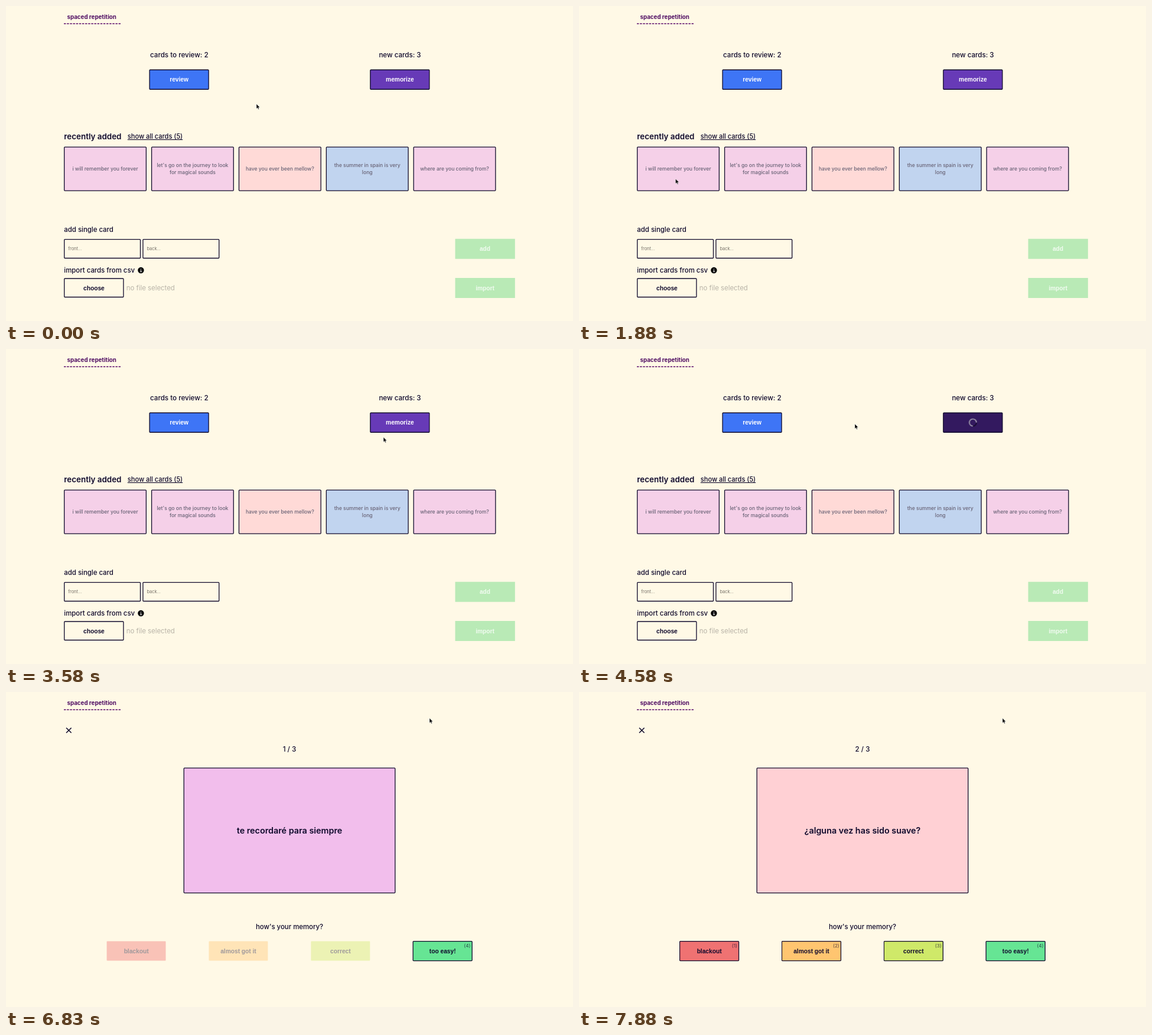
An HTML page that plays this animation: 960 px wide and 534 px high, repeating every 8000 ms.

```html
<!DOCTYPE html>
<html lang="en">
<head>
<meta charset="utf-8">
<title>Flashcards</title>
<style>
  html, body { margin: 0; width: 100%; height: 100%; overflow: hidden; background: #fff9e6; }
  svg { display: block; width: 960px; height: 534px; }
  text { font: 500 11.4px Inter, sans-serif; fill: #100a2c; }
  .mid { text-anchor: middle; }
  .brand { font-size: 9.75px; font-weight: 700; fill: #4f0d62; }
  .count { font-size: 11.6px; }
  .heading { font-size: 13.4px; font-weight: 600; }
  .link { font-size: 11.05px; text-decoration: underline; }
  .label { font: 700 10.2px "Liberation Sans", Arial, sans-serif; text-anchor: middle; }
  .white { fill: #fff; }
  .soft { fill: #fff; opacity: .8; }
  .cards text { font-size: 8.55px; text-anchor: middle; fill: #686275; }
  .field { font-size: 7.4px; font-weight: 400; fill: #777269; }
  .file { font-weight: 400; fill: #b9b4a8; }
  .face { font-size: 14.35px; font-weight: 600; text-anchor: middle; }
  .hint { font-size: 8.1px; font-weight: 400; text-anchor: end; fill: #100a2c; opacity: .7; }
  .line { stroke: #100a2c; stroke-width: 1.3; }
  .empty { fill: none; }

  [class*="t-"] { animation: 8s step-end infinite; }
  .t-home { animation-name: home; }
  .t-study { animation-name: study; }
  .t-first { animation-name: first; }
  .t-second { animation-name: second; }
  .t-ask1 { animation-name: ask1; }
  .t-tell1 { animation-name: tell1; }
  .t-ask2 { animation-name: ask2; }
  .t-tell2 { animation-name: tell2; }
  .t-show { animation-name: show; }
  .t-grade { animation-name: grade; }
  .t-idle { animation-name: idle; }
  .t-busy { animation-name: busy; }
  .t-fill { animation-name: fill; }
  .t-arrow { animation-name: arrow; }
  .t-beam { animation-name: beam; }
  .t-hand { animation-name: hand; }
  .t-dim { animation-name: dim; animation-timing-function: linear; }
  .t-drop { animation-name: drop; animation-timing-function: linear; }
  .t-move { animation-name: move; animation-timing-function: linear; }
  .spin { animation: spin 1s linear infinite; }

  @keyframes home { 0% { opacity: 1 } 57.875%, 100% { opacity: 0 } }
  @keyframes study { 0% { opacity: 0 } 57.875%, 100% { opacity: 1 } }
  @keyframes first { 0% { opacity: 1 } 87.5%, 100% { opacity: 0 } }
  @keyframes second { 0% { opacity: 0 } 87.5%, 100% { opacity: 1 } }
  @keyframes ask1 { 0% { opacity: 1 } 74%, 100% { opacity: 0 } }
  @keyframes tell1 { 0% { opacity: 0 } 74% { opacity: 1 } 87.5%, 100% { opacity: 0 } }
  @keyframes ask2 { 0% { opacity: 0 } 87.5% { opacity: 1 } 97.375%, 100% { opacity: 0 } }
  @keyframes tell2 { 0% { opacity: 0 } 97.375%, 100% { opacity: 1 } }
  @keyframes show { 0% { opacity: 1 } 74% { opacity: 0 } 87.5% { opacity: 1 } 97.375%, 100% { opacity: 0 } }
  @keyframes grade { 0% { opacity: 0 } 74% { opacity: 1 } 87.5% { opacity: 0 } 97.375%, 100% { opacity: 1 } }
  @keyframes idle { 0% { opacity: 1 } 49.5%, 100% { opacity: 0 } }
  @keyframes busy { 0% { opacity: 0 } 49.5%, 100% { opacity: 1 } }
  @keyframes fill { 0% { fill: #673ab7 } 44.8% { fill: #55309c } 49.5%, 100% { fill: #33195f } }
  @keyframes arrow { 0% { opacity: 1 } 15.3% { opacity: 0 } 16.8% { opacity: 1 } 44.8% { opacity: 0 } 49.5%, 100% { opacity: 1 } }
  @keyframes beam { 0% { opacity: 0 } 15.3% { opacity: 1 } 16.8%, 100% { opacity: 0 } }
  @keyframes hand { 0% { opacity: 0 } 44.8% { opacity: 1 } 49.5%, 100% { opacity: 0 } }
  @keyframes dim { 0%, 84.4% { opacity: 1 } 85.3%, 87.5% { opacity: .4 } 87.51%, 100% { opacity: 1 } }
  @keyframes drop { 0%, 84.4% { opacity: 1 } 85.3%, 87.5% { opacity: 0 } 87.51%, 100% { opacity: 1 } }
  @keyframes spin { from { transform: rotate(241deg) } to { transform: rotate(601deg) } }
  @keyframes move {
    0% { transform: translate(424px, 166px) }
    3.7% { transform: translate(424px, 166px); animation-timing-function: ease-in-out }
    10.375%, 12% { transform: translate(665px, 92px); animation-timing-function: ease-in-out }
    15.625% { transform: translate(156px, 226px); animation-timing-function: ease-out }
    22.375% { transform: translate(162px, 292px) }
    23.5% { transform: translate(163.5px, 293px) }
    26.2% { transform: translate(163.5px, 293px); animation-timing-function: ease-in }
    31.75% { transform: translate(426px, 348px) }
    33.1% { transform: translate(526px, 310px); animation-timing-function: ease-out }
    34.375%, 38.6% { transform: translate(504px, 266px) }
    40.125% { transform: translate(506px, 268px) }
    41.7% { transform: translate(506px, 268px); animation-timing-function: ease-in-out }
    45.875% { transform: translate(662px, 129px) }
    51% { transform: translate(662px, 129px); animation-timing-function: ease-in-out }
    56.25% { transform: translate(467px, 127px) }
    66.2% { transform: translate(467px, 127px); animation-timing-function: ease-out }
    67.75%, 100% { transform: translate(717px, 44.3px) }
  }
</style>
</head>
<body>
<svg viewBox="0 0 960 534">
  <defs>
    <rect id="btn" x=".65" y=".65" width="100" height="33" rx="1"/>
    <rect id="card" x=".65" y=".65" width="138.7" height="74" rx="1"/>
    <rect id="big" x="301.2" y="128.9" width="357.6" height="211.7" rx="1"/>
  </defs>

  <text class="brand" x="103.5" y="21.8">spaced repetition</text>
  <path d="M98 30H194" stroke="#5c0d6b" stroke-width="1.7" stroke-dasharray="3.5 1.64"/>

  <g class="t-home">
    <text class="count mid" x="293.3" y="87.2">cards to review: 2</text>
    <text class="count mid" x="667" y="87.2">new cards: 3</text>

    <g transform="translate(242.4 107.6)">
      <use href="#btn" class="line" fill="#3e75f6"/>
      <text class="label white" x="50.7" y="20.7">review</text>
    </g>
    <g transform="translate(616.2 107.6)">
      <g class="t-fill"><use href="#btn" class="line"/></g>
      <g class="t-idle"><text class="label white" x="50.7" y="20.7">memorize</text></g>
      <g class="t-busy" fill="none" stroke-width="1.3">
        <g transform="translate(50.7 17)">
          <circle r="6" stroke="#0d0620"/>
          <circle class="spin" r="6" stroke="#cdc6da" pathLength="100" stroke-dasharray="75 25"/>
        </g>
      </g>
    </g>

    <text class="heading" x="98.3" y="225.8">recently added</text>
    <text class="link" x="205.8" y="225">show all cards (5)</text>

    <g class="cards">
      <g transform="translate(98 238.4)">
        <use href="#card" class="line" fill="#f5d0e8"/>
        <text x="70" y="41">i will remember you forever</text>
      </g>
      <g transform="translate(245.9 238.4)">
        <use href="#card" class="line" fill="#f5d0e8"/>
        <text x="70" y="35">let's go on the journey to look</text>
        <text x="70" y="47">for magical sounds</text>
      </g>
      <g transform="translate(393.8 238.4)">
        <use href="#card" class="line" fill="#ffdad7"/>
        <text x="70" y="41">have you ever been mellow?</text>
      </g>
      <g transform="translate(541.7 238.4)">
        <use href="#card" class="line" fill="#c1d4ef"/>
        <text x="70" y="35">the summer in spain is very</text>
        <text x="70" y="47">long</text>
      </g>
      <g transform="translate(689.5 238.4)">
        <use href="#card" class="line" fill="#f5d0e8"/>
        <text x="70" y="41">where are you coming from?</text>
      </g>
    </g>

    <text x="98.3" y="383.2">add single card</text>
    <rect class="line empty" x="98.7" y="395.7" width="128.8" height="31.8" rx="1"/>
    <rect class="line empty" x="231.9" y="395.7" width="128.8" height="31.8" rx="1"/>
    <text class="field" x="105.3" y="414.2">front...</text>
    <text class="field" x="238.5" y="414.2">back...</text>

    <text x="98.3" y="451.5">import cards from csv</text>
    <circle cx="228.4" cy="448" r="5.2"/>
    <path d="M228.5 445v1.2M227.5 447.6h1.1v2.9M227.2 450.6h2.6" stroke="#fff" fill="none"/>
    <rect class="line empty" x="98.7" y="462" width="100.2" height="31.5" rx="1"/>
    <text class="label" x="148.9" y="481.7">choose</text>
    <text class="file" x="203.7" y="482.4">no file selected</text>

    <g fill="#b9eab6">
      <rect x="760.5" y="394.7" width="101.3" height="34"/>
      <rect x="760.5" y="461" width="101.3" height="34"/>
    </g>
    <text class="label soft" x="811" y="415.3">add</text>
    <text class="label soft" x="811" y="481.7">import</text>
  </g>

  <g class="t-study">
    <path d="M102 60.7l8.6 8.6M110.6 60.7l-8.6 8.6" stroke="#100a2c" stroke-width="1.6"/>

    <g class="t-first">
      <text class="count mid" x="480" y="100.8">1 / 3</text>
      <use href="#big" class="line" fill="#f2beec"/>
    </g>
    <g class="t-second">
      <text class="count mid" x="480" y="100.8">2 / 3</text>
      <use href="#big" class="line" fill="#ffd0d4"/>
    </g>
    <g class="t-ask1"><text class="face" x="480" y="240.3">i will remember you forever</text></g>
    <g class="t-tell1"><text class="face" x="480" y="240.3">te recordaré para siempre</text></g>
    <g class="t-ask2"><text class="face" x="480" y="240.3">have you ever been mellow?</text></g>
    <g class="t-tell2"><text class="face" x="480" y="240.3">¿alguna vez has sido suave?</text></g>

    <g class="t-show">
      <g transform="translate(429.3 421.9)">
        <use href="#btn" class="line" fill="#3e75f6"/>
        <text class="label white" x="50.7" y="20.7">show answer</text>
        <text class="hint" x="98" y="10.9">(space)</text>
      </g>
    </g>

    <g class="t-grade">
      <text class="mid" x="480" y="402.3">how's your memory?</text>
      <g transform="translate(169.9 421.9)">
        <g class="t-dim">
          <use href="#btn" fill="#ef7272"/>
          <text class="label" x="50.7" y="20.7">blackout</text>
        </g>
        <g class="t-drop">
          <use href="#btn" class="line empty"/>
          <text class="hint" x="98" y="10.9">(1)</text>
        </g>
      </g>
      <g transform="translate(342.8 421.9)">
        <g class="t-dim">
          <use href="#btn" fill="#ffc570"/>
          <text class="label" x="50.7" y="20.7">almost got it</text>
        </g>
        <g class="t-drop">
          <use href="#btn" class="line empty"/>
          <text class="hint" x="98" y="10.9">(2)</text>
        </g>
      </g>
      <g transform="translate(515.7 421.9)">
        <g class="t-dim">
          <use href="#btn" fill="#cfe969"/>
          <text class="label" x="50.7" y="20.7">correct</text>
        </g>
        <g class="t-drop">
          <use href="#btn" class="line empty"/>
          <text class="hint" x="98" y="10.9">(3)</text>
        </g>
      </g>
      <g transform="translate(688.5 421.9)">
        <use href="#btn" class="line" fill="#66e594"/>
        <text class="label" x="50.7" y="20.7">too easy!</text>
        <text class="hint" x="98" y="10.9">(4)</text>
      </g>
    </g>
  </g>

  <g class="t-move">
    <g class="t-arrow">
      <path d="M0 0V8.2L1.9 6.5 3.1 9.3 4.5 8.7 3.3 6H5.8Z" stroke="#fff" stroke-width=".5"/>
    </g>
    <g class="t-beam">
      <path d="M-1.8 -4.5Q0 -4.5 0 -3.3V3.3Q0 4.5 -1.8 4.5M1.8 -4.5Q0 -4.5 0 -3.3M0 3.3Q0 4.5 1.8 4.5M-1 1.5H1" fill="none" stroke="#222" stroke-width=".8"/>
    </g>
    <g class="t-hand">
      <path d="M-.9 .6Q0 -.6 .9 .6V3.4L5 4.2Q6 4.6 5.8 6L5 9.6H.2L-2.8 6Q-2.6 4.8 -.9 6Z" fill="#fff" stroke="#000" stroke-width=".7"/>
    </g>
  </g>
</svg>
</body>
</html>
```
